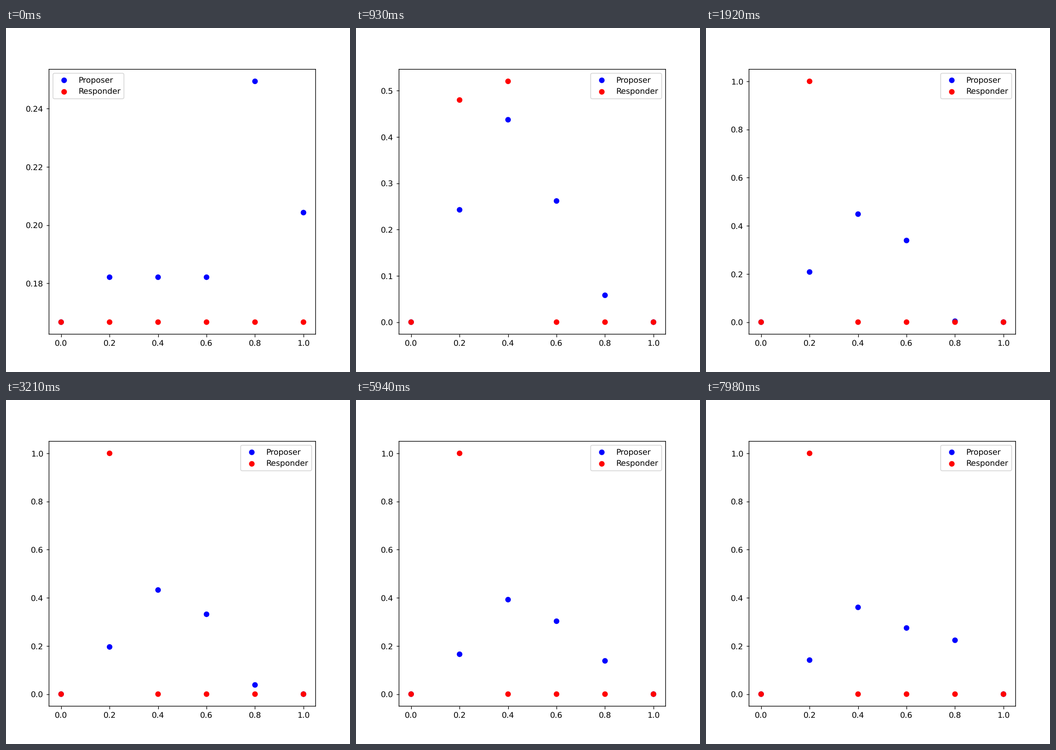
A matplotlib script that plays this animation: 748 by 748 pixels, repeating every 8000 ms.

```python
import math
import numpy as np
import matplotlib.pyplot as plt
from matplotlib.animation import FuncAnimation

plt.rcParams["font.family"] = "DejaVu Sans"
plt.rcParams["text.hinting"] = "none"

FRAMES, INTERVAL = 400, 20   # 8 s loop
STEP = 30                    # ms between data updates
OFFERS = np.linspace(0, 1, 6)

# Proposer shares of the offers 0.2 to 0.8 at the turning points
T_MID, T_SETTLED, T_END = .93, 1.92, 7.98
START = np.array([.1821, .1821, .1821, .2494])
MID = np.array([.2426, .4372, .2617, .0580])
SETTLED = np.array([.2082, .4485, .3390, .0038])
END = np.array([.1413, .3604, .2747, .2237])
DRIFT = np.array([1.1, 1.1, 1.4, 1.2])


def mix(a, b, u):
    return a + (b - a) * u


def ease_out(u):
    return 1 - (1 - u) ** 1.5


def fade(t):
    """Decay of the strategies that die out early."""
    return max(0, 1 - t / .78) ** 1.5


def proposer(t):
    if t < T_MID:
        inner = mix(START, MID, ease_out(t / T_MID))
    elif t < T_SETTLED:
        u = (t - T_MID) / (T_SETTLED - T_MID)
        inner = mix(MID, SETTLED, ease_out(u))
    else:
        u = (t - T_SETTLED) / (T_END - T_SETTLED)
        inner = mix(SETTLED, END, u ** DRIFT)
    return np.array([fade(t) / 6, *inner, .2043 * fade(t)])


def responder(t):
    """Threshold 0.4 peaks first, then 0.2 takes over completely."""
    low, peak = fade(t) / 6, .5416
    if t < .8:
        r4 = mix(1 / 6, peak, math.sin(math.pi / 2 * t / .8))
    else:
        u = min(1, (t - .8) / 1.02)
        r4 = peak * (1 + math.cos(math.pi * u)) / 2
    return np.array([low, 1 - r4 - 4 * low, r4, low, low, low])


def dots(color, label):
    # one colour per dot keeps the positions off the pixel grid
    return ax.scatter(OFFERS, 0 * OFFERS, color=[color] * 6, label=label)


fig, ax = plt.subplots(figsize=(6, 6), dpi=748 / 6)
blue = dots("blue", "Proposer")
red = dots("red", "Responder")
ax.set_xlim(-.05, 1.05)
legend = ax.legend(loc="best")
for edge in [*ax.spines.values(), legend.get_frame()]:
    edge.set_snap(False)


def update(i):
    t = (i * INTERVAL + 10) // STEP * STEP / 1000
    p, r = proposer(t), responder(t)
    blue.set_offsets(np.column_stack([OFFERS, p]))
    red.set_offsets(np.column_stack([OFFERS, r]))
    lo, hi = min(p.min(), r.min()), max(p.max(), r.max())
    pad = .05 * (hi - lo)
    ax.set_ylim(lo - pad, hi + pad)
    return blue, red


anim = FuncAnimation(fig, update, frames=FRAMES, interval=INTERVAL,
                     init_func=lambda: update(0), repeat=True,
                     repeat_delay=0, blit=False)
plt.show()
```
